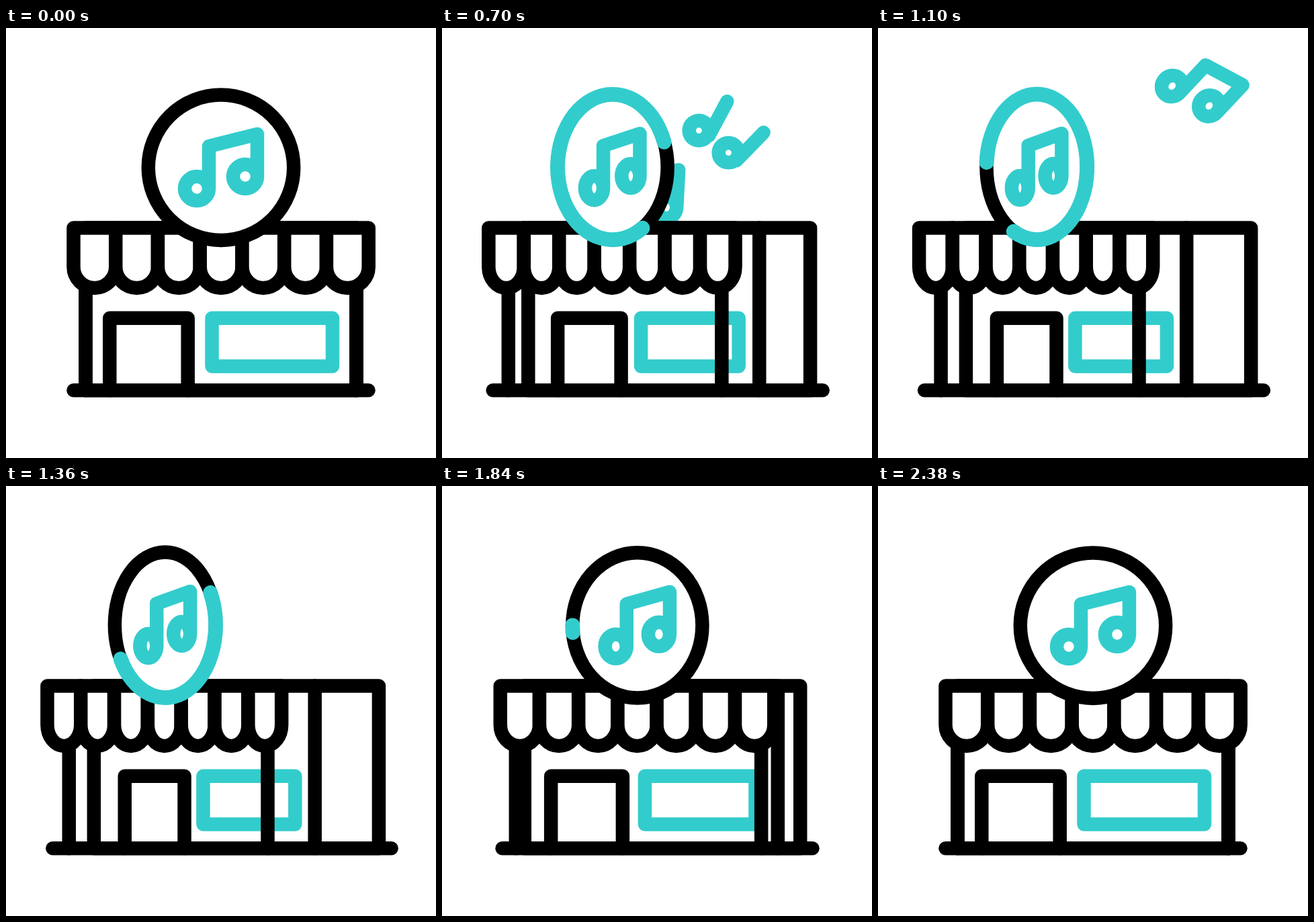
Animation of 640x640 px, one loop 2400 ms. Source, as an HTML page with a canvas:

```html
<!DOCTYPE html>
<html lang="en">
<head>
<meta charset="utf-8">
<title>Music shop</title>
<style>
  html, body { margin: 0; height: 100%; overflow: hidden; background: #fff; }
  canvas { display: block; }
</style>
</head>
<body>
<canvas id="stage" width="640" height="640"></canvas>
<script>
const ctx = document.getElementById('stage').getContext('2d');
const LOOP = 2400, TEAL = '#33cccc', BLACK = '#000', WHITE = '#fff', LINE = 20.5;
const ROOF = 297.5, GROUND = 539.3, RAD = Math.PI / 180;

const clamp = x => Math.max(0, Math.min(1, x));
const smooth = (t, from, to) => {
  const x = clamp((t - from) / (to - from));
  return x * x * (3 - 2 * x);
};

// cubic-bezier(.8, 0, .2, 1), solved by bisection
function turnEase(x) {
  let lo = 0, hi = 1;
  for (let i = 0; i < 24; i++) {
    const s = (lo + hi) / 2, r = 1 - s;
    if (2.4 * r * r * s + 0.6 * r * s * s + s * s * s < x) lo = s; else hi = s;
  }
  return lo * lo * (3 - 2 * lo);
}

function draw(color, build, fill, width = LINE) {
  ctx.beginPath();
  build();
  if (fill) { ctx.fillStyle = fill; ctx.fill(); }
  ctx.strokeStyle = color;
  ctx.lineWidth = width;
  ctx.stroke();
}

function polyline(...points) {
  points.forEach(([x, y], i) => i ? ctx.lineTo(x, y) : ctx.moveTo(x, y));
}

function oval(x, y, rx, ry) {
  ctx.moveTo(x + rx, y);
  ctx.ellipse(x, y, rx, ry, 0, 0, 2 * Math.PI);
}

// Builds a path in a transformed space while keeping the pen width
function placed(x, y, angle, sx, sy, build) {
  ctx.save();
  ctx.translate(x, y);
  ctx.rotate(angle * RAD);
  ctx.scale(sx, sy);
  build();
  ctx.restore();
}

function beamedNote() {
  polyline([-27, 36], [-27, -27], [45, -45], [45, 18]);
  oval(-45, 36, 18, 18);
  oval(27, 18, 18, 18);
}

function singleNote() {
  polyline([18, 0], [18, -63]);
  oval(0, 0, 16, 16);
}

function flyingBeamed(u) {
  if (u < -450 || u > 130) return;
  const x = 487 + 0.39 * u - 0.00012 * u * u;
  const y = 89 - 0.365 * u + 0.000094 * u * u;
  draw(TEAL, () => placed(x, y, 43 + 0.1 * u, 0.84, 0.9, beamedNote));
}

function flyingSingles(u) {
  if (u < -300 || u > 265) return;
  const dx = 0.4 * u, dy = -0.37 * u, turn = 0.1 * u;
  draw(TEAL, () => {
    placed(382 + dx, 153 + dy, 28 + turn, 0.92, 0.92, singleNote);
    placed(426 + dx, 186 + dy, 44 + turn, 0.92, 0.92, singleNote);
  });
}

function awning(left, right) {
  const w = (right - left) / 7, bend = 355.6;
  for (let i = 0; i < 7; i++) {
    const x = left + i * w;
    draw(BLACK, () => {
      ctx.moveTo(x, ROOF);
      ctx.lineTo(x, bend);
      ctx.ellipse(x + w / 2, bend, w / 2, 31.3, 0, Math.PI, 0, true);
      ctx.lineTo(x + w, ROOF);
      ctx.closePath();
    }, WHITE);
  }
}

function sign(t, mix) {
  const x = mix(320, 236), y = mix(207.7, 206.8), rx = mix(108.2, 74.7), ry = 108.2;
  draw(BLACK, () => oval(x, y, rx, ry), WHITE);

  const offset = 180 * smooth(t, 40, 1800);
  const tail = offset + 360 * smooth(t, 790, 1925);
  const head = offset + 360 * smooth(t, 0, 1000);
  if (head - tail > 0.01) {
    draw(TEAL, () => ctx.ellipse(x, y, rx, ry, 0, tail * RAD, head * RAD), null, 22);
  }
  draw(TEAL, () => placed(mix(329, 242), mix(203, 202), 0, mix(1, 0.689), 1, beamedNote));
}

function render(t) {
  const p = turnEase(1 - Math.abs(t / 1200 - 1));
  const mix = (a, b) => a + (b - a) * p;

  ctx.fillStyle = WHITE;
  ctx.fillRect(0, 0, 640, 640);
  ctx.lineCap = ctx.lineJoin = 'round';

  flyingBeamed(t - 480);
  flyingSingles(t - 700);
  flyingBeamed(t - 1100);

  const wallLeft = mix(118.5, 131), wallRight = mix(521.5, 459), backRight = mix(521.5, 555.3);
  draw(BLACK, () => ctx.rect(wallLeft, ROOF, backRight - wallLeft, GROUND - ROOF), WHITE);
  draw(BLACK, () => polyline([wallRight, ROOF], [wallRight, GROUND]));

  const winLeft = mix(306.5, 293.3), winRight = mix(486, 429.7);
  draw(TEAL, () => ctx.rect(winLeft, 431.8, winRight - winLeft, 71.7));

  const doorLeft = mix(154.3, 177), doorRight = mix(270.7, 265.5);
  draw(BLACK, () => polyline([doorLeft, GROUND], [doorLeft, 431.8], [doorRight, 431.8], [doorRight, GROUND]));

  for (const x of [mix(118.5, 93.5), mix(521.5, 388)]) {
    draw(BLACK, () => polyline([x, 370], [x, GROUND]));
  }
  awning(mix(100.5, 61), mix(539.7, 408.7));
  draw(BLACK, () => polyline([mix(100.5, 69), GROUND], [mix(539.5, 574), GROUND]));
  sign(t, mix);
}

function tick(now) {
  render(now % LOOP);
  requestAnimationFrame(tick);
}
requestAnimationFrame(tick);
</script>
</body>
</html>
```
